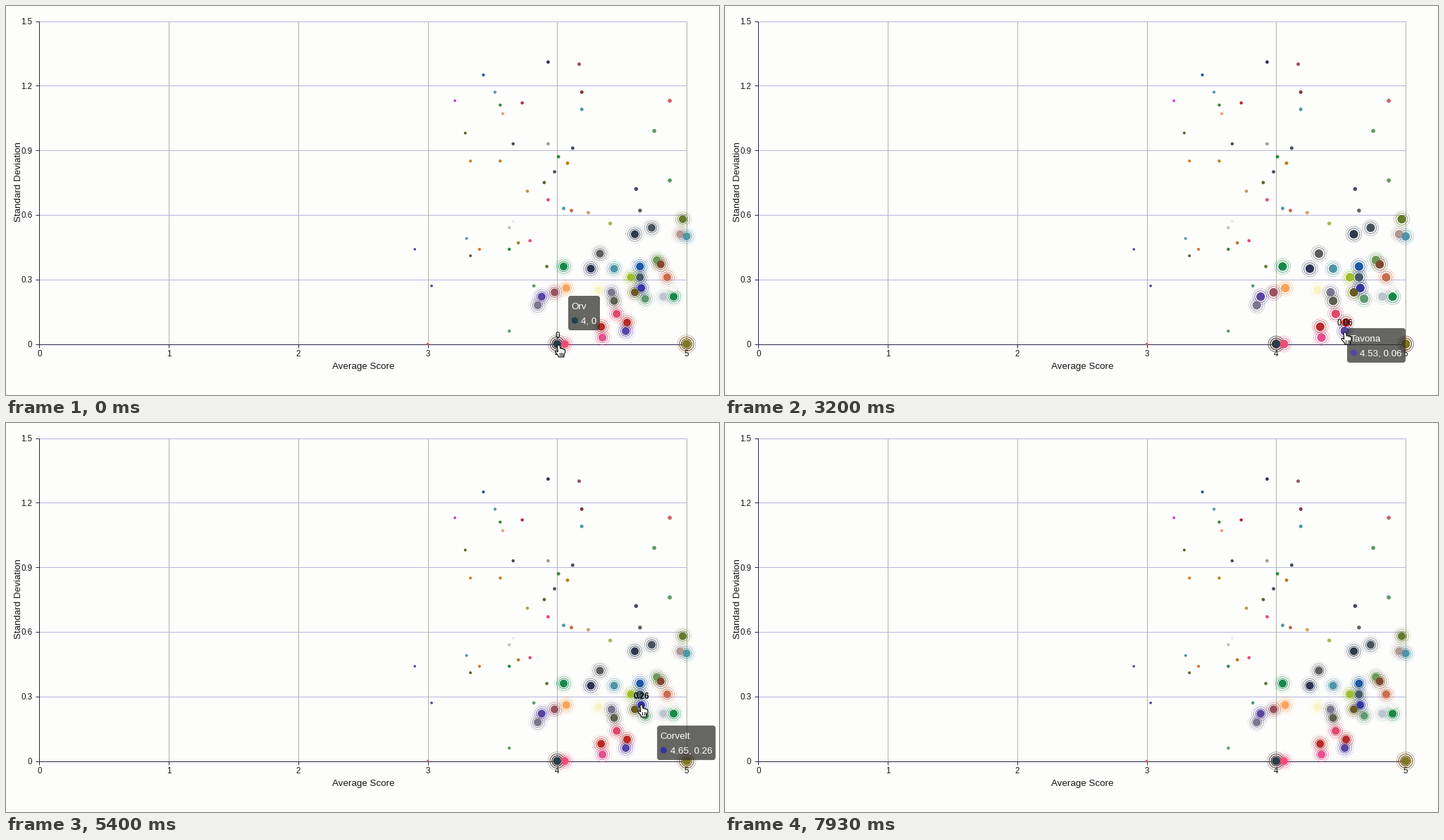
A matplotlib script that plays this animation: 1012x553 px, repeating every 7990 ms.

```python
import matplotlib.pyplot as plt
from matplotlib.animation import FuncAnimation
from matplotlib.patches import FancyBboxPatch, Circle, Polygon

W, H, DPI = 1012, 553, 64  # a power of two keeps the pixel size exact
LOOP, STEP = 7990, 47
PX = 72 / DPI  # points per pixel
X0, Y0, UX, UY = 47.5, 480.5, 183.7, 306
TICK, TEXT = 11.5 * PX, 13.4 * PX
DOT = 11.2     # diameter of a pulsing dot

plt.rcParams["font.family"] = "Liberation Sans"

PLAIN = {
    "#2b3150": [(3.93, 1.31)], "#9c4f6b": [(4.17, 1.30)],
    "#1f55a0": [(3.43, 1.25)], "#c548c0": [(3.21, 1.13)],
    "#5496a2": [(3.52, 1.17), (4.19, 1.09), (4.05, .63), (3.30, .49)],
    "#7c3a34": [(4.19, 1.17)], "#b82c33": [(3.73, 1.12)],
    "#cc6670": [(4.87, 1.13)], "#f0a080": [(3.58, 1.07)],
    "#2f8c34": [(3.56, 1.11), (4.01, .87)],
    "#5f6030": [(3.29, .98), (3.90, .75), (3.33, .41)],
    "#4a4a58": [(3.66, .93)], "#a89c88": [(3.93, .93)],
    "#46525f": [(4.12, .91), (3.98, .80)],
    "#5f9a68": [(4.75, .99), (4.87, .76), (3.82, .27), (3.63, .06)],
    "#d9760e": [(3.33, .85)], "#bf7e10": [(3.56, .85), (4.08, .84)],
    "#b89a58": [(3.77, .71)], "#e4497a": [(3.93, .67), (3.79, .48)],
    "#c66a4c": [(4.11, .62), (3.0, 0)], "#e0a060": [(4.24, .61)],
    "#444a66": [(4.61, .72)], "#66645a": [(4.64, .62)],
    "#a0b84a": [(4.41, .56)], "#bfc0c0": [(3.63, .54)],
    "#ececf0": [(3.66, .57)], "#b07428": [(3.70, .47)],
    "#d9702a": [(3.40, .44)], "#1f8a44": [(3.63, .44)],
    "#49469a": [(2.90, .44), (3.03, .27)], "#5f7a2c": [(3.92, .36)],
}

PULSING = {
    "#667a2e": [(4.97, .58)], "#46545e": [(4.73, .54)],
    "#2b3a4e": [(4.60, .51)], "#b09890": [(4.95, .51)],
    "#4f95a5": [(5.0, .50), (4.44, .35)], "#5c5c5c": [(4.33, .42)],
    "#6a9a5c": [(4.77, .39)], "#80482f": [(4.80, .37), (4.0, 0), (5.0, 0)],
    "#16894a": [(4.05, .36), (4.90, .22)], "#2c3354": [(4.26, .35)],
    "#1d57a5": [(4.64, .36)], "#9cc02e": [(4.57, .31)],
    "#455a64": [(4.64, .31)], "#cc6c4e": [(4.85, .31)],
    "#f8a458": [(4.07, .26)], "#9a5260": [(3.98, .24)],
    "#5a45a0": [(3.88, .22)], "#7a7690": [(3.85, .18), (4.42, .24)],
    "#f6f4c4": [(4.32, .25)], "#f4f4f2": [(4.90, .26)],
    "#5f5f50": [(4.44, .20)], "#665c20": [(4.60, .24)],
    "#3436a0": [(4.65, .26)], "#5f9a70": [(4.68, .21)],
    "#bcc4cc": [(4.82, .22)], "#e0486c": [(4.46, .14)],
    "#b92a26": [(4.54, .10), (4.34, .08)], "#5545a5": [(4.53, .06)],
    "#e5508e": [(4.35, .03)], "#7c3a34": [(4.0, 0), (5.0, 0)],
    "#f54a78": [(4.06, 0)], "#24404a": [(4.0, 0)], "#7c7a20": [(5.0, 0)],
}

# start, end, name, x, y, colour, box width, label weight
HOVERS = [
    (0, 700, "Orv", 4, 0, "#24404a", 45, "normal"),
    (700, 2680, "Ilmea", 4.06, 0, "#e5508e", 64, "normal"),
    (3000, 3740, "Tavona", 4.53, .06, "#5545a5", 83, "normal"),
    (4500, 7070, "Corvelt", 4.65, .26, "#3436a0", 83, "bold"),
]
HIDE_DELAY = 100

# time, x, y
POINTER = [(0, 784.5, 482), (500, 784.5, 482), (900, 796, 481),
           (2600, 796, 481), (3050, 880, 464), (3650, 880, 464),
           (4070, 953.5, 477), (4130, 953.5, 477), (4600, 903, 404),
           (5300, 902, 401), (5600, 901, 400), (7000, 901, 399.5),
           (7190, 880, 570), (LOOP, 880, 570)]
TIP = [(0, 798, 412), (700, 798, 412), (950, 813, 412), (3040, 813, 412),
       (3200, 883, 458), (3540, 900, 484), (3900, 900, 484),
       (4480, 900, 461), (4700, 929, 435), (5150, 929, 435),
       (5400, 924, 430), (5600, 920, 419), (LOOP, 920, 419)]

HAND = [(-2, 1), (-1, -.2), (.5, -.2), (1.6, 1), (2.2, 5), (3.5, 4.6),
        (4.6, 5.4), (5.8, 5.2), (6.9, 6.2), (8, 6.2), (9, 7.5), (9, 10.5),
        (7.8, 13.5), (7.4, 17), (0, 17), (-1, 14.5), (-4.8, 10),
        (-4.8, 8.4), (-3, 8.2), (-1.3, 10)]
ARROW = [(0, 0), (0, 14.5), (3.3, 11.4), (5.8, 17), (8.2, 16),
         (5.8, 10.5), (10.3, 10.5)]


def px(x, y):
    return X0 + x * UX, Y0 - y * UY


def area(d):
    return (d * PX) ** 2


def smooth(u):
    return u * u * (3 - 2 * u)


def ease_out(u):
    return 1 - (1 - u) ** 2


def along(keys, t, ease):
    for (t0, xa, ya), (t1, xb, yb) in zip(keys, keys[1:]):
        if t <= t1:
            u = ease((t - t0) / (t1 - t0))
            return xa + (xb - xa) * u, ya + (yb - ya) * u
    return keys[-1][1:]


def flatten(groups):
    items = [(*px(*p), p[0], c) for c, pts in groups.items() for p in pts]
    return list(zip(*items))


def shift(shape, x, y):
    return [(x + a, y + b) for a, b in shape]


fig = plt.figure(figsize=(W / DPI, H / DPI), dpi=DPI, facecolor="#fdfdfc")
ax = fig.add_axes([0, 0, 1, 1])
ax.set_xlim(0, W)
ax.set_ylim(H, 0)
ax.axis("off")


def line(x, y, color, z):
    ax.plot(x, y, color=color, lw=PX, zorder=z, solid_capstyle="butt")


def label(x, y, s, size, z=2, color="#141414", ha="center", **kw):
    return ax.text(x, y, s, fontsize=size, color=color, ha=ha,
                   va="center_baseline", zorder=z, **kw)


# grid, axes and tick labels
right, top = px(5, 1.5)
for i in range(6):
    x, y = px(i, i * .3)
    if i:
        line([x, x], [top, Y0], "#b2b2a4", 1)
        line([X0, right], [y, y], "#b6b6de", 1)
    line([x, x], [Y0, Y0 + 5], "#26264c", 2)
    line([X0 - 5, X0], [y, y], "#26264c", 2)
    label(x, 494, str(i), TICK)
    label(37.5, y, f"{i * .3:.1f}" if i else "0", TICK, ha="right")
line([X0, right], [Y0, Y0], "#26264c", 2)
line([X0, X0], [top, Y0], "#26264c", 2)
label(507, 511.5, "Average Score", TEXT)
ax.text(18, 250.5, "Standard Deviation", fontsize=TEXT, color="#141414",
        rotation=90, ha="center", va="center", zorder=2)

# dots and their expanding rings
xs, ys, scores, cols = flatten(PLAIN)
ax.scatter(xs, ys, s=[area(1.2 * v) for v in scores], c=cols,
           linewidths=0, zorder=3)
xs, ys, _, cols = flatten(PULSING)
ax.scatter(xs, ys, s=area(DOT), c=cols, linewidths=0, zorder=5)
rings = [ax.scatter(xs, ys, s=area(DOT), facecolors="none", edgecolors=cols,
                    linewidths=PX, zorder=4) for _ in range(3)]

value = label(0, 0, "", TICK, 6, "black")

# tooltip
box = FancyBboxPatch((0, 0), 45, 49, boxstyle="round,pad=0,rounding_size=4",
                     fc="#32322c", ec="none", alpha=.74, zorder=7)
bullet = Circle((0, 0), 4.6, ec="none", zorder=8)
ax.add_patch(box)
ax.add_patch(bullet)
name = label(0, 0, "", TEXT, 8, "white", "left")
pair = label(0, 0, "", TEXT, 8, "white", "left")
tooltip = [box, bullet, name, pair]

# mouse pointers
hand = Polygon(HAND, fc="white", ec="black", lw=1.1 * PX, zorder=9)
arrow = Polygon(ARROW, fc="black", ec="white", lw=PX, zorder=9)
ax.add_patch(hand)
ax.add_patch(arrow)
creases = [ax.plot([], [], color="black", lw=.9 * PX, zorder=10)[0]
           for _ in range(3)]


def draw_rings(t):
    for k, ring in enumerate(rings):
        p = (.2 + 2 * t / LOOP + k / 3) % 1
        ring.set_sizes([area(DOT * (1 + 1.5 * p))], DPI)
        ring.set_alpha(1 - p)


def draw_tooltip(t):
    shown = [h for h in HOVERS if h[0] <= t < h[1] + HIDE_DELAY]
    for part in tooltip:
        part.set_visible(bool(shown))
    if not shown:
        return
    _, _, who, sx, sy, color, width, _ = shown[-1]
    x, y = along(TIP, t, ease_out)
    box.set_bounds(x, y, width, 49)
    bullet.set_center((x + 9.3, y + 35))
    bullet.set_facecolor(color)
    name.set_text(who)
    name.set_position((x + 4.7, y + 14.8))
    pair.set_text(f"{sx:g}, {sy:g}")
    pair.set_position((x + 18.5, y + 35))


def draw_pointer(t):
    x, y = along(POINTER, t, smooth)
    over = [h for h in HOVERS if h[0] <= t < h[1]]
    hand.set_visible(bool(over))
    arrow.set_visible(not over)
    value.set_visible(bool(over))
    hand.set_xy(shift(HAND, x, y))
    arrow.set_xy(shift(ARROW, x, y))
    for i, crease in enumerate(creases):
        cx = x + 1.4 + 2.3 * i
        crease.set_data([cx, cx], [y + 10.5, y + 14.5])
        crease.set_visible(bool(over))
    if over:
        _, _, _, sx, sy, _, _, weight = over[-1]
        lx, ly = px(sx, sy)
        value.set_position((lx, ly - 13))
        value.set_text(f"{sy:g}")
        value.set_fontweight(weight)


def update(i):
    t = i * STEP
    draw_rings(t)
    draw_tooltip(t)
    draw_pointer(t)
    return []


anim = FuncAnimation(fig, update, frames=LOOP // STEP, interval=STEP,
                     repeat=True, repeat_delay=0, blit=False)
plt.show()
```
